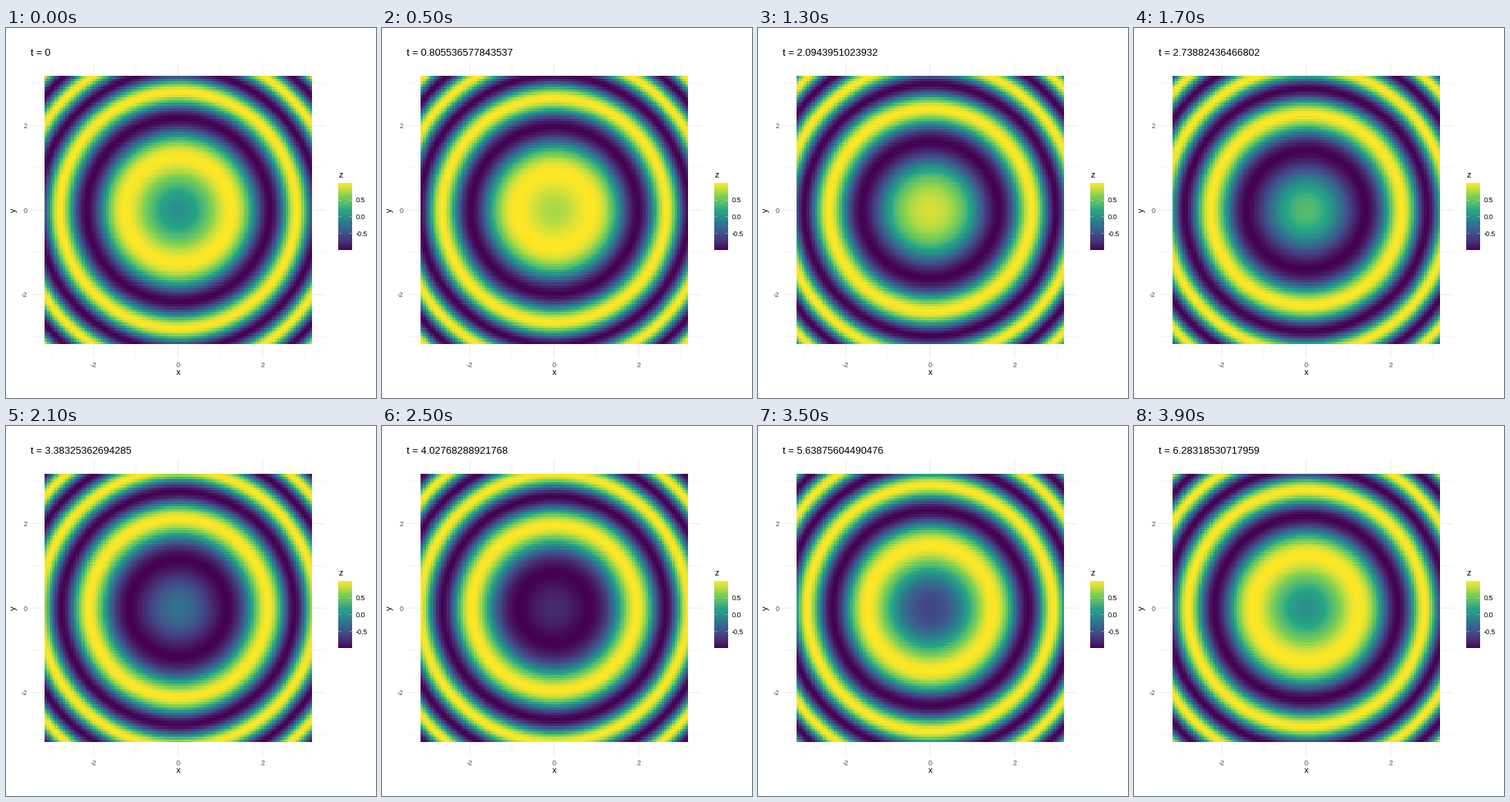
These frames come from a looping animation (480 by 480 pixels, 4000 ms). A matplotlib script:

```python
import numpy as np
import matplotlib.pyplot as plt
from matplotlib.animation import FuncAnimation

plt.rcParams["font.family"] = "Liberation Sans"

SIZE, FRAMES, INTERVAL = 480, 40, 100
CELLS = 100
CX, CY = 223.43, 236.2            # plot origin in pixels
HALF = 173.88                     # half the side of the tiled square
UNIT = 2 * HALF / (2 * np.pi * CELLS / (CELLS - 1))
PANEL = HALF * 1.1
WHITE_XYZ = np.array([0.95047, 1.0, 1.08883])
RGB_TO_XYZ = np.array([[0.4124564, 0.3575761, 0.1804375],
                       [0.2126729, 0.7151522, 0.0721750],
                       [0.0193339, 0.1191920, 0.9503041]])


def rgb_to_lab(rgb):
    lin = np.where(rgb <= 0.04045, rgb / 12.92, ((rgb + 0.055) / 1.055) ** 2.4)
    xyz = lin @ RGB_TO_XYZ.T / WHITE_XYZ
    f = np.where(xyz > 0.008856, np.cbrt(xyz), 7.787 * xyz + 16 / 116)
    x, y, z = f.T
    return np.stack([116 * y - 16, 500 * (x - y), 200 * (y - z)], axis=1)


def lab_to_rgb(lab):
    light, a, b = lab.T
    y = (light + 16) / 116
    f = np.stack([y + a / 500, y, y - b / 200], axis=1)
    xyz = np.where(f > 0.20689, f ** 3, (f - 16 / 116) / 7.787) * WHITE_XYZ
    lin = np.clip(xyz @ np.linalg.inv(RGB_TO_XYZ).T, 0, 1)
    rgb = np.where(lin <= 0.0031308, 12.92 * lin, 1.055 * lin ** (1 / 2.4) - 0.055)
    return np.clip(rgb, 0, 1)


def make_palette(n=1024):
    """Six key colours blended in Lab space."""
    keys = ["440154", "414487", "2A788E", "22A884", "7AD151", "FDE725"]
    rgb = np.array([[int(k[i:i + 2], 16) for i in (0, 2, 4)] for k in keys]) / 255
    lab = rgb_to_lab(rgb)
    at, stops = np.linspace(0, 1, n), np.linspace(0, 1, len(keys))
    mixed = np.stack([np.interp(at, stops, channel) for channel in lab.T], axis=1)
    return np.round(lab_to_rgb(mixed) * 255).astype(np.uint8)


PALETTE = make_palette()


def colour(z):
    return PALETTE[np.round((z + 1) / 2 * (len(PALETTE) - 1)).astype(int)]


def cell_index(start, stop, centre):
    """Cell number under each pixel centre."""
    pixels = np.arange(start, stop) + 0.5
    return np.clip(((pixels - centre + HALF) * CELLS / (2 * HALF)).astype(int), 0, CELLS - 1)


fig = plt.figure(figsize=(SIZE / 72, SIZE / 72), dpi=72, facecolor="white")
ax = fig.add_axes([0, 0, 1, 1])
ax.axis("off")


def line(xs, ys, width, shade, z):
    ax.plot(xs, ys, color=shade, lw=width, zorder=z, snap=False, solid_capstyle="butt")


def label(x, y, text, size, shade="black", **kw):
    return ax.text(x, y, text, fontsize=size, color=shade, va="baseline", zorder=5, **kw)


# Grid and axis labels
for v in range(-3, 4):
    if v % 2:
        width = 0.53
    else:
        width = 1.07
        label(CX + v * UNIT, 440, str(v), 9, "#4D4D4D", ha="center")
        label(27.3, CY - v * UNIT + 3.4, str(v), 9, "#4D4D4D", ha="right")
    x, y = CX + v * UNIT, CY - v * UNIT
    line([x, x], [CY - PANEL, CY + PANEL], width, "#EBEBEB", 1)
    line([CX - PANEL, CX + PANEL], [y, y], width, "#EBEBEB", 1)

label(CX, 450.5, "x", 11, ha="center")
ax.text(12.5, CY, "y", fontsize=11, rotation=90, rotation_mode="anchor",
        ha="center", va="baseline")
title = label(32, 36, "", 13)

# Colour bar
BAR_X, BAR_W, BAR_Y, BAR_H = 431.4, 17.28, 244.8, 86.4
ax.imshow(colour(np.linspace(1, -1, 300))[:, None], aspect="auto", zorder=2,
          interpolation="nearest",
          extent=(BAR_X, BAR_X + BAR_W, BAR_Y + BAR_H / 2, BAR_Y - BAR_H / 2))
label(BAR_X, 194.5, "z", 11)
for v in (0.5, 0.0, -0.5):
    y = BAR_Y - v * BAR_H / 2
    for x in (BAR_X, BAR_X + BAR_W * 0.8):
        line([x, x + BAR_W / 5], [y, y], 0.375, "white", 3)
    label(454, y + 3.2, f"{v:.1f}", 9)

# Wave field
grid = np.linspace(-np.pi, np.pi, CELLS)
radius2 = grid[None, :] ** 2 + grid[:, None] ** 2
LEFT, RIGHT, TOP, BOTTOM = 50, 397, 62, 410
tiles = np.ix_(cell_index(TOP, BOTTOM, CY), cell_index(LEFT, RIGHT, CX))
field = ax.imshow(colour(np.sin(radius2))[tiles], aspect="auto", zorder=2,
                  interpolation="nearest", extent=(LEFT, RIGHT, BOTTOM, TOP))
ax.set_xlim(0, SIZE)
ax.set_ylim(SIZE, 0)


def update(i):
    t = 2 * np.pi * i / (FRAMES - 1)
    field.set_data(colour(np.sin(radius2 + t))[tiles])
    title.set_text(f"t = {t:.15g}")
    return field, title


anim = FuncAnimation(fig, update, frames=FRAMES, interval=INTERVAL, repeat=True)
plt.show()
```
